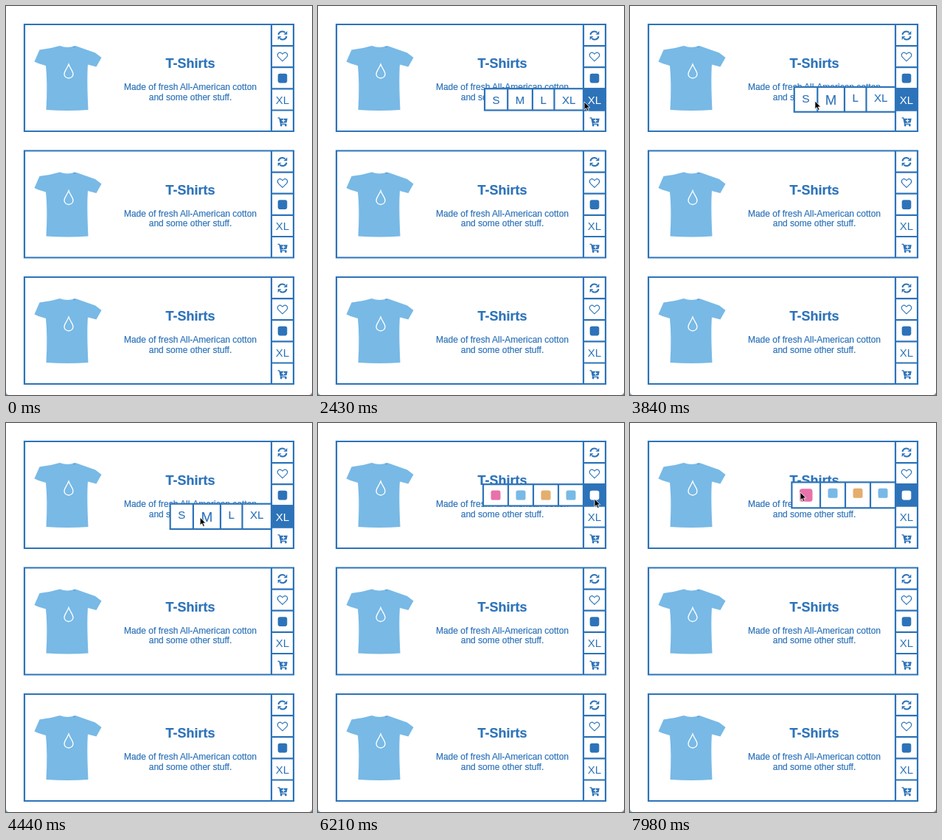
An HTML page that plays this animation: 415x528 px, repeating every 8000 ms.

```html
<!DOCTYPE html>
<html lang="en">
<head>
<meta charset="utf-8">
<title>T-Shirt cards</title>
<style>
  html, body { margin: 0; width: 100%; height: 100%; overflow: hidden; background: #fff; }
  svg { display: block; width: 415px; height: 528px; }
  text { font-family: "Liberation Sans", Arial, sans-serif; text-anchor: middle; }
</style>
</head>
<body>
<svg id="stage" viewBox="0 0 415 528"></svg>
<script>
const BLUE = '#2d73b9', SKY = '#78b9e6', PINK = '#e872aa', SAND = '#e4ae6e';
const LOOP = 8000, FADE = 100, RIGHT = 360, ROW = 29.3;
const stage = document.getElementById('stage');

const box = (x, y, w, h, attrs) => `<rect x="${x}" y="${y}" width="${w}" height="${h}" ${attrs}/>`;

const shirt = `
  <path fill="${SKY}" d="M73 54 Q83 58 94 54 L121 63.500 L129.500 70 L122.500 82.500 L111 79.500
    Q109.500 100 111.500 141 Q84 143 54.500 141 Q56.500 105 54 81 L44 78 L38.500 75.500
    L45.500 59.500 Q60 58 73 54Z"/>
  <path fill="none" stroke="${BLUE}" stroke-width=".7" d="M91.500 55 L93.500 56"/>
  <path fill="none" stroke="#fff" stroke-width="1.300" d="M85 79 C83 85 79 88 79 92.500
    A6 5.500 0 0 0 91 92.500 C91 88 87 85 85 79Z"/>`;

const arrow = `<path d="M-5.500 -1 A5.300 5.300 0 0 1 3.500 -4" fill="none" stroke="${BLUE}" stroke-width="2"/>
  <path d="M6.300 -6 V-1.200 H1.500Z" fill="${BLUE}"/>`;

const icons = `
  <g transform="translate(375 40)">${arrow}<g transform="rotate(180)">${arrow}</g></g>
  <path transform="translate(375 69)" fill="none" stroke="${BLUE}" stroke-width="1.100"
    d="M0 5.800 L-5.600 .4 C-8.600 -3 -5 -7.600 -1.200 -4.900 L0 -3.700 L1.200 -4.900 C5 -7.600 8.600 -3 5.600 .4Z"/>
  <g transform="translate(375 157)" fill="${BLUE}">
    <path d="M-6.500 -5.200 H-4.300 L-2.300 3.300 H5.300" fill="none" stroke="${BLUE}" stroke-width="1.300"/>
    <path d="M-4.300 -4.200 H6.800 L5.700 1.200 L-2.800 2.200Z"/>
    <circle cx="-1.800" cy="5" r="1.400"/><circle cx="4.400" cy="5" r="1.400"/>
    <path d="M1.300 -3.700 V.9 M-1 -1.400 H3.600" stroke="#fff" stroke-width="1.100"/>
  </g>`;

const swatch = fill => box(368.7, 91.8, 12.6, 12.6, `rx="2.800" fill="${fill}"`);
const sizeLabel = fill => `<text x="375" y="132.800" font-size="15" fill="${fill}">XL</text>`;

const card = y => `<g transform="translate(0 ${y})">
  ${shirt}
  <g fill="${BLUE}" stroke="${BLUE}" stroke-width=".2">
    <text x="250" y="84" font-size="18" font-weight="bold">T-Shirts</text>
    <text x="250" y="114" font-size="12">Made of fresh All-American cotton</text>
    <text x="250" y="127.700" font-size="12">and some other stuff.</text>
  </g>
  <path fill="none" stroke="${BLUE}" stroke-width="2.200"
    d="M25 25 H390 V170 H25Z M360 25 V170 M360 54.200 H390 M360 83.200 H390 M360 112.300 H390 M360 141.500 H390"/>
  ${icons}${swatch(BLUE)}${sizeLabel(BLUE)}
</g>`;

// Each hover lists [enter, leave] times.
const menus = [
  { top: 112.2, grow: 5, hover: [2335, 5640], label: sizeLabel('#fff'), cells: [
    { text: 'S', em: .667, hovers: [[3820, 4340]] },
    { text: 'M', em: .833, hovers: [[3580, 3820], [4340, 4540]] },
    { text: 'L', em: .556, hovers: [[3410, 3580], [4540, 4690]] },
    { text: 'XL', em: 1.223, hovers: [[3060, 3410], [4690, 4850]] }
  ] },
  { top: 83.2, grow: 5.6, hover: [5640, 9000], label: swatch('#fff'), cells: [
    { fill: PINK, hovers: [[7680, 9000]] },
    { fill: SKY, hovers: [[7470, 7680]] },
    { fill: SAND, hovers: [[6860, 7470]] },
    { fill: SKY, hovers: [[6460, 6860]] }
  ] }
];

// Cursor tip: time, x, y.
const path = [
  [810, 272, -14], [1140, 264, 97], [1530, 264, 97], [1650, 259, 99], [2310, 354, 132],
  [2430, 361, 130], [3030, 361, 130], [3390, 317, 128], [3840, 251, 129], [3960, 247, 129],
  [4290, 247, 129], [4440, 263, 128], [4950, 363, 127], [5550, 363, 127], [5790, 375, 103],
  [6210, 375, 103], [6750, 343, 94], [6990, 289, 96], [7080, 288, 95], [7410, 288, 95],
  [7960, 231, 94]
];

const menuMarkup = m => `<g class="menu">
  <g class="popup">
    <rect class="frame" fill="#fff" stroke="${BLUE}" stroke-width="2.200"/>
    <path class="rules" stroke="${BLUE}" stroke-width="2.200"/>
    ${m.cells.map(c => c.text
      ? `<text class="cell" fill="${BLUE}" stroke="${BLUE}" stroke-width=".15">${c.text}</text>`
      : `<rect class="cell" fill="${c.fill}"/>`).join('')}
  </g>
  ${box(359, m.top - 1, 32, ROW + 2, `fill="${BLUE}"`)}${m.label}
</g>`;

stage.innerHTML = [0, 171.5, 343].map(card).join('') + menus.map(menuMarkup).join('') + `
  <path d="M0 524 Q.5 527.500 4 528 H0Z" fill="#6fb4d6"/>
  <path d="M415 524 Q414.500 527.500 411 528 H415Z" fill="#7f8a94"/>
  <path id="cursor" fill="#000" stroke="#fff" stroke-width=".8" stroke-linejoin="round"
    d="M0 0 V10.800 L2.500 8.500 L4.300 12.600 L6.200 11.800 L4.400 7.900 H7.800Z"/>`;

const cursor = document.getElementById('cursor');
document.querySelectorAll('.menu').forEach((el, i) => {
  const m = menus[i];
  m.el = el;
  m.frame = el.querySelector('.frame');
  m.rules = el.querySelector('.rules');
  el.querySelectorAll('.cell').forEach((c, k) => { m.cells[k].el = c; });
});

const set = (el, attrs) => { for (const k in attrs) el.setAttribute(k, attrs[k]); };
const ramp = (t, start) => {
  const u = Math.min(1, Math.max(0, (t - start) / FADE));
  return u * u * (3 - 2 * u);
};
const level = (t, [a, b]) => ramp(t, a) - ramp(t, b);

function slope(i, k) {
  const a = path[i - 1], p = path[i], b = path[i + 1];
  if (!a || !b || a[k] === p[k] || p[k] === b[k]) return 0;
  return (b[k] - a[k]) / (b[0] - a[0]);
}

function along(t, k) {
  if (t <= path[0][0]) return path[0][k];
  const j = path.findIndex(p => p[0] > t);
  if (j < 0) return path[path.length - 1][k];
  const a = path[j - 1], b = path[j], d = b[0] - a[0];
  const u = (t - a[0]) / d, v = 1 - u;
  return v * v * (1 + 2 * u) * a[k] + u * u * (1 + 2 * v) * b[k]
    + d * u * v * (v * slope(j - 1, k) - u * slope(j, k));
}

function drawMenu(m, t) {
  const shown = level(t, m.hover);
  set(m.el, { opacity: shown });
  if (!shown) return;
  const levels = m.cells.map(c => c.hovers.reduce((s, h) => s + level(t, h), 0));
  const peak = Math.max(...levels);
  const top = m.top - peak * m.grow / 2, height = ROW + peak * m.grow;
  let x = RIGHT, rules = '';
  for (let i = m.cells.length - 1; i >= 0; i--) {
    const c = m.cells[i], g = levels[i];
    const size = c.text ? 15 + 4 * g : 13 + 4.6 * g;
    const width = c.text ? c.em * size + 21.2 : size + 21;
    const mid = x - width / 2;
    if (c.text) {
      set(c.el, { x: mid, y: top + 20.4 + 3.6 * g, 'font-size': size });
    } else {
      set(c.el, { x: mid - size / 2, y: top + 8.4 + .4 * g, width: size, height: size, rx: size * .2 });
    }
    x -= width;
    if (i) rules += `M${x} ${top}v${height}`;
  }
  set(m.frame, { x, y: top, width: RIGHT - x, height });
  set(m.rules, { d: rules });
}

function render(t) {
  menus.forEach(m => drawMenu(m, t));
  set(cursor, { transform: `translate(${along(t, 1)} ${along(t, 2)})` });
}

const start = performance.now();
function tick() {
  render((performance.now() - start) % LOOP);
  requestAnimationFrame(tick);
}
tick();
</script>
</body>
</html>
```
